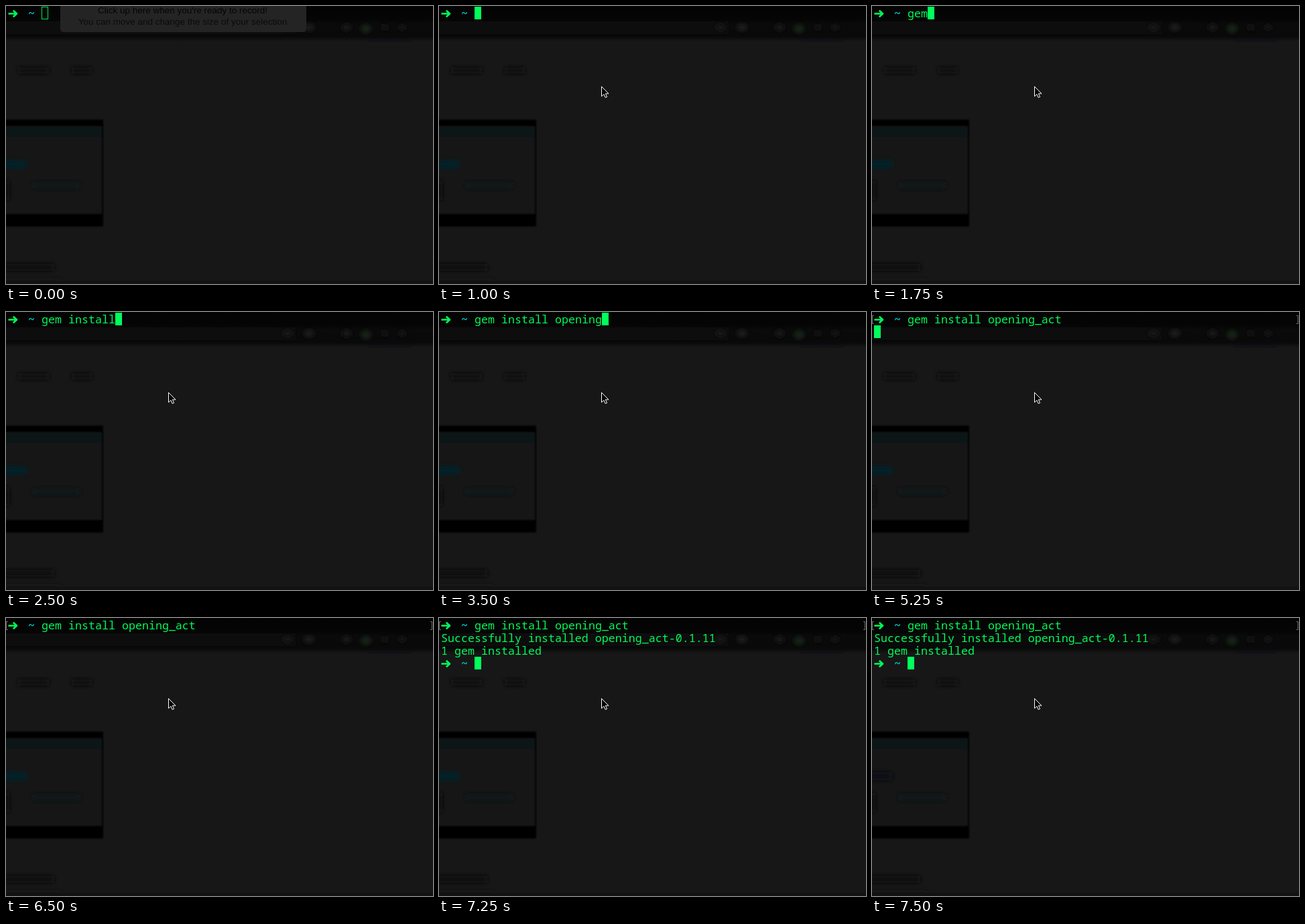
Write an HTML page that moves like this. It is 637x416 px and loops after 8 s.

```html
<!DOCTYPE html>
<html lang="en">
<head>
<meta charset="utf-8">
<title>Terminal install</title>
<style>
  html, body { margin: 0; width: 100%; height: 100%; overflow: hidden; background: #171717; }
  svg { display: block; width: 637px; height: 416px; }
  .term { font: 16.667px "Noto Sans Mono", monospace; fill: #00fb59; white-space: pre; }
  .tilde { font-weight: 700; fill: #00d0cf; }
  .tip { font: 13.5px "Liberation Sans", Arial, sans-serif; text-anchor: middle; }
</style>
</head>
<body>
<svg viewBox="0 0 637 416">
  <defs>
    <filter id="soft" x="-20%" y="-60%" width="140%" height="220%"><feGaussianBlur stdDeviation="1.3"/></filter>
    <filter id="hazy" x="-50%" y="-150%" width="200%" height="400%"><feGaussianBlur stdDeviation="3"/></filter>
    <linearGradient id="top" x1="0" y1="0" x2="0" y2="1">
      <stop offset="0" stop-color="#030303"/>
      <stop offset=".38" stop-color="#050505"/>
      <stop offset=".5" stop-color="#0a0a0a"/>
      <stop offset=".86" stop-color="#090909"/>
      <stop offset="1" stop-color="#171717"/>
    </linearGradient>
    <g id="prompt">
      <path d="M3.5 11.5H15M10.8 6.8 16 11.5 10.8 16.2" fill="none" stroke="#00fb59" stroke-width="2.7" stroke-linejoin="round"/>
      <text class="term tilde" x="33" y="17">~</text>
    </g>
  </defs>

  <rect width="637" height="416" fill="#171717"/>
  <rect width="637" height="53" fill="url(#top)"/>
  <rect id="bar" x="-8" y="23" width="440" height="19" rx="3" fill="#101010" filter="url(#soft)"/>

  <g filter="url(#hazy)">
    <ellipse cx="420" cy="32" rx="8" ry="5" fill="#161616"/>
    <ellipse cx="452" cy="32" rx="8" ry="6" fill="#1a1a1a"/>
    <ellipse cx="508" cy="32" rx="8" ry="6" fill="#131313"/>
    <ellipse cx="537" cy="34" rx="8" ry="7" fill="#132016"/>
    <ellipse cx="565" cy="32" rx="4" ry="6" fill="#121212"/>
    <ellipse cx="591" cy="32" rx="6" ry="5" fill="#121212"/>
    <rect x="18" y="92" width="46" height="9" fill="#0d0d0d"/>
    <rect x="98" y="92" width="30" height="9" fill="#0f0f0f"/>
    <rect x="-8" y="386" width="80" height="10" fill="#0e0e0e"/>
    <rect x="-8" y="409" width="90" height="6" fill="#131313"/>
  </g>
  <rect x="540" y="49" width="64" height="3" fill="#0b0d16" filter="url(#soft)"/>

  <g filter="url(#soft)">
    <rect x="-8" y="170" width="153" height="160" fill="#050505"/>
    <rect id="pane" x="-8" y="180" width="151" height="131" fill="#141515"/>
    <rect x="-8" y="181" width="151" height="15" fill="#111212"/>
  </g>
  <g filter="url(#hazy)">
    <rect id="link" x="-8" y="231" width="38" height="12" fill="#03202b"/>
    <rect x="40" y="264" width="70" height="9" fill="#111314"/>
    <rect x="-8" y="262" width="13" height="28" fill="#0c0c0c"/>
  </g>
  <path d="M145.5 330V416" stroke="#151515"/>
  <rect y="411" width="637" height="5" fill="#131212"/>

  <g id="hint">
    <path d="M81 0H448V34Q448 39 443 39H86Q81 39 81 34Z" fill="#242424"/>
    <text class="tip" x="263.5" y="11" font-weight="700" fill="#050505">Click up here when you're ready to record!</text>
    <text class="tip" x="263.5" y="28" fill="#0b0b0b">You can move and change the size of your selection</text>
  </g>

  <path id="marks" d="M3 5.5H.5V17.5H3M633 5.5H635.5V17.5H633" fill="none" stroke="#6c6c6c"/>
  <use href="#prompt"/>
  <text id="cmd" class="term" x="53" y="17"></text>
  <g id="result">
    <text class="term" x="3" y="36">Successfully installed opening_act-0.1.11</text>
    <text class="term" x="3" y="55">1 gem installed</text>
    <use href="#prompt" y="57"/>
  </g>
  <rect id="block" width="10" height="19" fill="#00ff5a"/>
  <rect id="frame" x="53.5" y="1.5" width="9" height="18" fill="none" stroke="#00e850"/>
  <path id="mouse" d="M.5.5V15.2L3.9 12 6.2 17 8.6 16 6.4 11.1H11Z" fill="#050505" stroke="#fff" stroke-linejoin="round"/>
</svg>
<script>
  const LOOP = 8000, CELL = 10, ROW = 19;
  const FULL = "gem install opening_act";
  const $ = id => document.getElementById(id);

  // [time, visible command]
  const typing = [
    [0, ""], [1500, "ge"], [1750, "gem"], [2000, "gem in"], [2250, "gem inst"],
    [2500, "gem install"], [2750, "gem install "], [3000, "gem install ope"],
    [3250, "gem install openi"], [3500, "gem install opening"],
    [3750, "gem install opening_A"], [4000, "gem install opening_Ac"],
    [4250, "gem install opening_Act"], [4500, "gem install opening_A"],
    [4750, "gem install opening_ac"], [5000, FULL]
  ];

  const between = (t, a, b) => t >= a && t < b;
  const show = (id, on) => $(id).setAttribute("visibility", on ? "visible" : "hidden");
  const place = (id, x, y) => $(id).setAttribute("transform", `translate(${x} ${y})`);

  function cursorAt(t, command) {
    if (t >= 7250) return [53, 1 + 3 * ROW];
    if (t >= 5250) return [3, 1 + ROW];
    return [53 + command.length * CELL, 1];
  }

  function draw(t) {
    const command = typing.filter(step => step[0] <= t).pop()[1];
    const blink = between(t, 500, 1000) || between(t, 6500, 7000);
    const late = t >= 7500;

    $("cmd").textContent = command;
    show("hint", t < 250);
    show("frame", t < 250);
    show("block", t >= 250 && !blink);
    place("block", ...cursorAt(t, command));
    show("mouse", t >= 250);
    place("mouse", ...(t < 500 ? [249, 96] : [242, 120]));
    show("marks", t >= 5250);
    show("result", t >= 7250);

    $("bar").setAttribute("opacity", late ? .4 : 1);
    $("pane").setAttribute("fill", late ? "#151515" : "#141515");
    $("link").setAttribute("fill", late ? "#0a1118" : "#03202b");
  }

  const start = performance.now();
  function tick() {
    draw((performance.now() - start) % LOOP);
    requestAnimationFrame(tick);
  }
  draw(0);
  requestAnimationFrame(tick);
</script>
</body>
</html>
```
